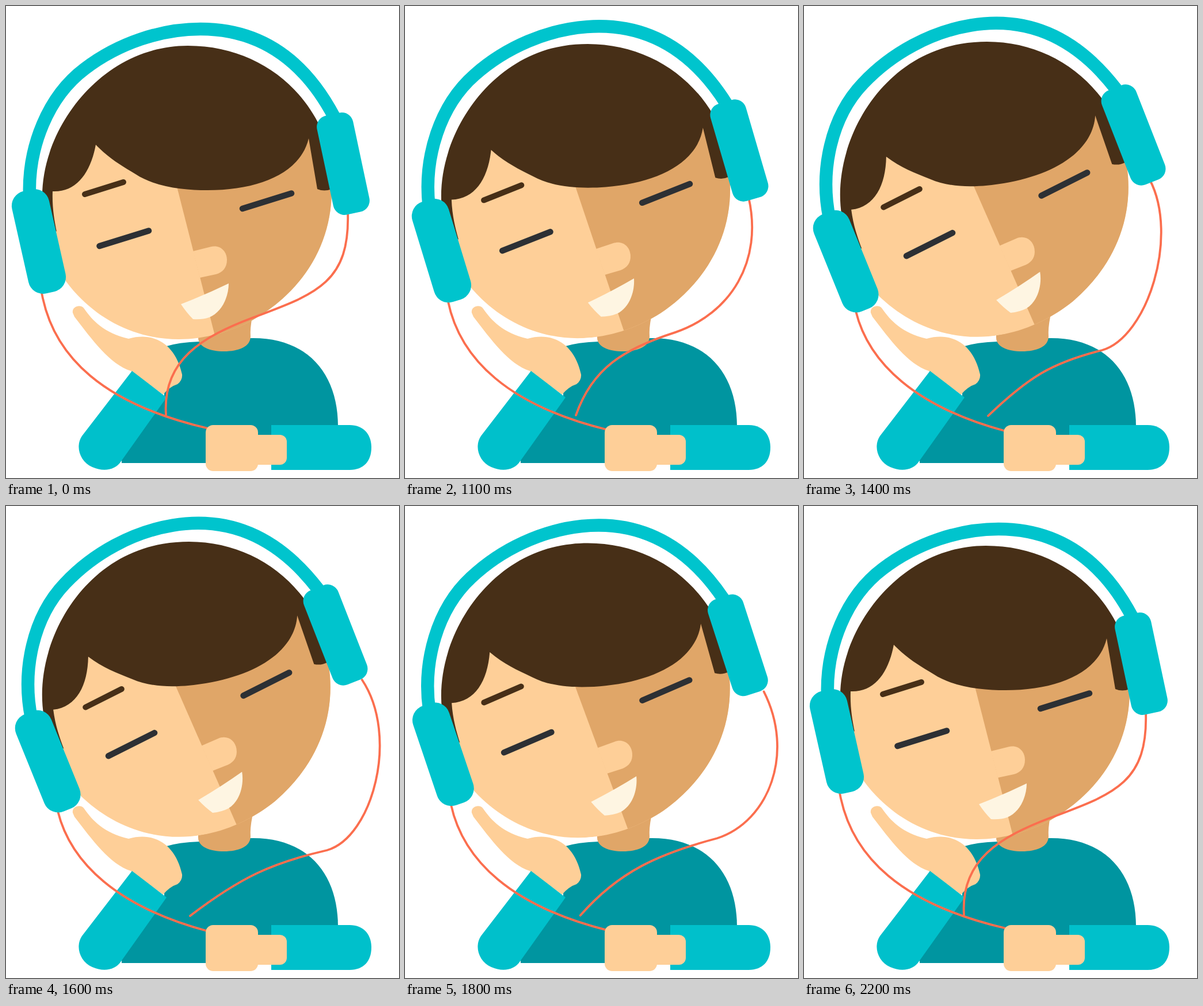
These frames come from a looping animation (683 by 820 pixels, 2400 ms). An HTML page:

```html
<!DOCTYPE html>
<html lang="en">
<head>
<meta charset="utf-8">
<title>Listening to music</title>
<style>
  html, body { margin: 0; width: 100%; height: 100%; overflow: hidden; background: #fff; }
  svg { display: block; width: 100%; height: 100%; }
  .skin { fill: #fecf98; }
  .shade { fill: #e0a668; }
  .hair { fill: #472f17; }
  .cyan { fill: #00c4cd; }
  .sleeve { fill: #00c0cb; }
  .line { fill: none; stroke-linecap: round; }
  .eye { stroke: #2d3034; stroke-width: 10.5; }
  .brow { stroke: #472f17; stroke-width: 10; }
  .band { stroke: #00c4cd; stroke-width: 22.5; }
  .cable { stroke: #fb6e4e; stroke-width: 3.8; }
</style>
</head>
<body>
<svg viewBox="0 0 683 820">
  <path fill="#0095a0" d="M201 794V786L275 680V592Q300 584 337 583L425 577C525 575 577 640 577 730V794Z"/>
  <path class="shade" d="M334 560V576C334 592 354 600 379 600S425 592 425 574Q424 560 428 540H334Z"/>

  <g class="tilt">
    <clipPath id="face">
      <path d="M78 320C80 400 92 450 104 478C150 540 220 579 300 579C345 579 390 566 428 546C510 500 566 420 566 320L540 200H150Z"/>
    </clipPath>
    <g clip-path="url(#face)">
      <path class="skin" d="M60 180H580V600H60Z"/>
      <path class="shade" d="M270 208H600V600H370Z"/>
    </g>
    <path class="skin" d="M325 426L355 418.5C372 414 384 426 384 441C384 455 376 463 365 466L337 472Z"/>
    <path fill="#fef5e2" d="M304 518Q348 501 387 482C387 504 376 532 353 541Q341 545 325 544Q314 533 304 518Z"/>
    <path class="hair" d="M63 330C63 210 168 69 316 69C420 69 505 125 546 210L566 318Q553 323 541 318L526 230C512 290 440 320 350 320C310 320 260 315 225 292C200 277 178 264 156 241C147 290 122 324 81 322C80 350 84 372 88 392L70 375Z"/>
    <path class="line brow" d="M137 327L204 306"/>
    <path class="line eye" d="M162.500 417L248 390.500M411 352L496 325.500"/>
  </g>

  <path class="skin" d="M116 533C114 522 130 517 136 526C150 546 170 568 213 578C260 565 295 590 306 640Q307 650 298 657Q285 661 273 675L217 634C180 622 150 580 119 540Z"/>
  <path class="sleeve" d="M219 634L279 680L200 791C190 806 170 810 150 801C128 791 120 765 132 747Z"/>
  <path class="line cable" id="left"/>
  <path class="line cable" id="right"/>

  <g class="tilt">
    <path class="line band" d="M41 330C38 245 73 157 137 109C196 64 270 40 338 40C442 40 518 94 570 192"/>
    <rect class="cyan" x="24" y="318" width="66" height="182" rx="26" transform="rotate(-12.700 57 409)"/>
    <rect class="cyan" x="554" y="186" width="64" height="176" rx="20" transform="rotate(-12 586 274)"/>
  </g>

  <path class="sleeve" d="M461 728H597C622 728 635 745 635 767C635 790 622 806 597 806H461Z"/>
  <rect class="skin" x="425" y="745" width="63" height="52" rx="12"/>
  <rect class="skin" x="347" y="728" width="91" height="80" rx="13"/>
</svg>
<script>
const LOOP = 2400, REST = 900, STEP = 100;
const LAST = 14, PEAK = 6;
const MAX_TILT = 9.4, SWAY = 58;

// Bezier points of each cable at rest, and how far a full tilt of the head moves them.
const cables = {
  left: {
    rest: [[62, 498], [82, 610], [170, 692], [352, 734]],
    shift: [[28, 32], [30, 10], [24, 5], [0, 5]],
    sway: 0
  },
  right: {
    rest: [[594, 358], [598, 480], [540, 500], [430, 541], [340, 575], [272, 615], [278, 710]],
    shift: [[7, -56], [54, -80], [57, 75], [88, 57], [90, 45], [118, 30], [42, 2]],
    sway: SWAY
  }
};

const tilted = document.querySelectorAll('.tilt');

function cablePath({ rest, shift, sway }, tilt, swing) {
  const points = rest.map(([x, y], i) => {
    const slack = Math.sin(Math.PI * (i + 1) / rest.length);
    return [x + shift[i][0] * tilt + sway * swing * slack, y + shift[i][1] * tilt];
  });
  return `M${points[0]}C${points.slice(1).join(' ')}`;
}

function draw(step) {
  const n = Math.min(step, LAST - step, PEAK);
  const angle = n ? 1.71 * n - 0.86 : 0;
  // The slack cable swings outward while the head comes back up.
  const swing = Math.sin(Math.PI * Math.max(0, step - PEAK) / (LAST - PEAK));
  tilted.forEach(g => g.setAttribute('transform', `rotate(${-angle} 275 331)`));
  for (const id in cables) {
    document.getElementById(id).setAttribute('d', cablePath(cables[id], angle / MAX_TILT, swing));
  }
}

const start = performance.now();
function tick() {
  const t = (performance.now() - start) % LOOP;
  draw(t < REST ? 0 : Math.min(LAST, Math.floor((t - REST) / STEP) + 1));
  requestAnimationFrame(tick);
}
tick();
</script>
</body>
</html>
```
